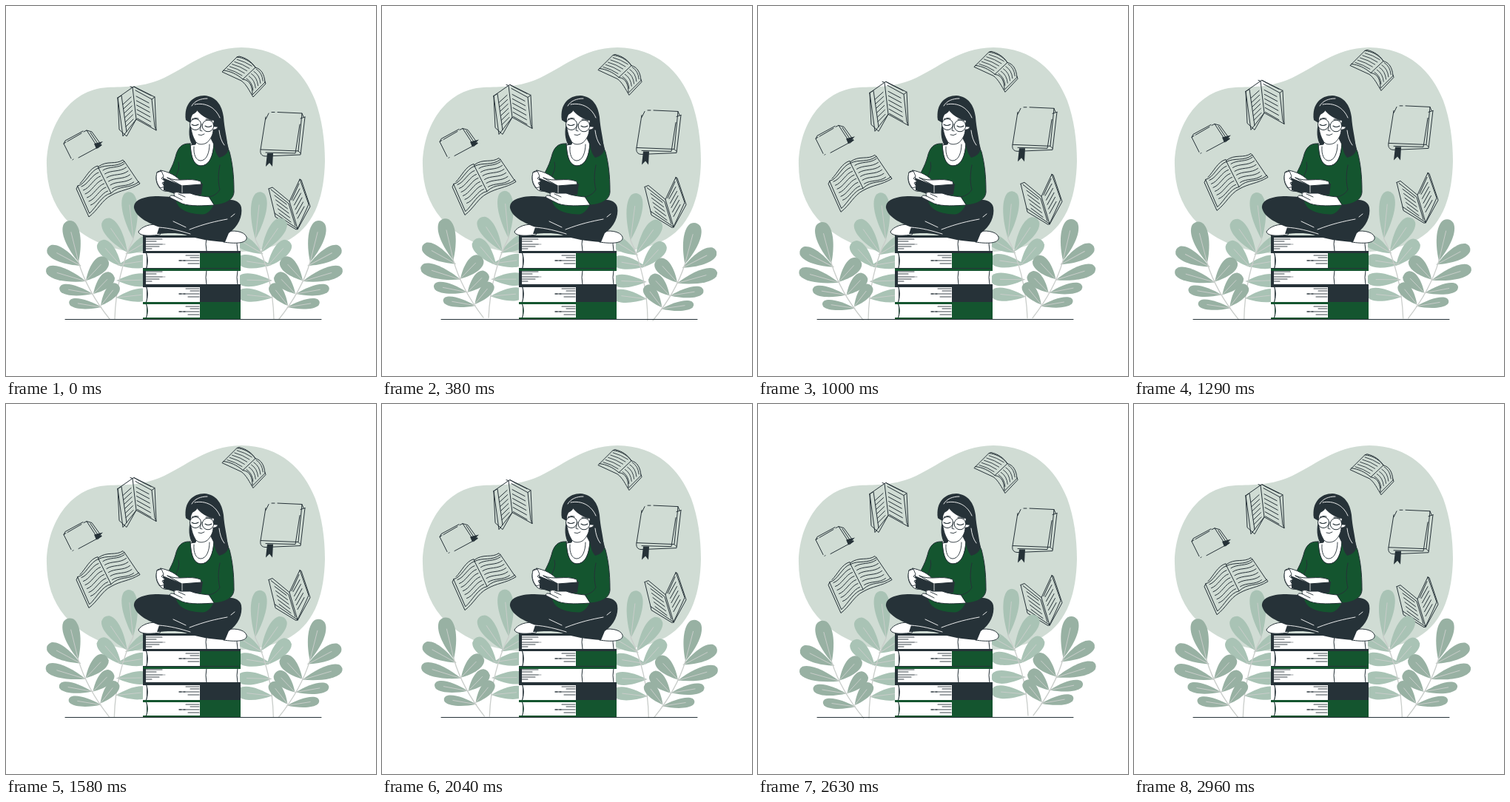
An HTML page with a canvas for the animation above (3000 ms loop, 500x500 px).

```html
<!DOCTYPE html>
<html lang="en">
<head>
<meta charset="utf-8">
<title>Reading on a stack of books</title>
<style>
html, body { margin: 0; width: 100%; height: 100%; overflow: hidden; background: #fff; }
canvas { display: block; width: 500px; height: 500px; }
</style>
</head>
<body>
<canvas id="stage"></canvas>
<script>
const INK = '#263238', GREEN = '#14552f', BLOB = '#d0dcd4';
const LEAF_DARK = '#98b1a3', LEAF_LIGHT = '#a9c3b5', STEM = '#c9cdca';
const canvas = document.getElementById('stage');
const dpr = window.devicePixelRatio || 1;
canvas.width = canvas.height = 500 * dpr;
const ctx = canvas.getContext('2d');
ctx.lineCap = ctx.lineJoin = 'round';

function fill(d, color) {
  ctx.fillStyle = color;
  ctx.fill(new Path2D(d));
}
function line(d, color = INK, width = 1) {
  ctx.strokeStyle = color;
  ctx.lineWidth = width;
  ctx.stroke(new Path2D(d));
}
function shape(d, color, edge = INK, width = 1) {
  fill(d, color);
  line(d, edge, width);
}
function rect(x, y, w, h, color) {
  ctx.fillStyle = color;
  ctx.fillRect(x, y, w, h);
}

function drawBlob() {
  fill('M55 215C55 163 85 113 137 110C161 109 181 110 207 100C245 84 269 57 318 56' +
    'C372 57 402 88 418 128C427 153 431 181 431 210C430 252 420 294 384 315' +
    'C354 331 322 333 288 333L185 334C142 331 105 315 80 287C63 267 55 242 55 215Z', BLOB);
}

// Floating books

function bookTopRight() {
  line('M294 87L312 69C321 70 330 74 337 83L320 99C312 92 303 88 294 87Z');
  line('M320 99C330 100 333 109 333 120L350 103C349 92 345 85 337 83');
  line('M294 87L292 89L318 101C325 106 329 115 334 123L351 105L350 102M312 69L315 68C324 70 332 75 337 83');
  for (let i = 0; i < 5; i++) {
    const x = 299 + i * 3.3, y = 85 - i * 3.2;
    line(`M${x} ${y}Q${x + 11} ${y + 3} ${x + 20} ${y + 9}`, INK, .9);
    line(`M${x + 26} ${y + 13}Q${x + 34} ${y + 18} ${x + 35} ${y + 29}`, INK, .9);
  }
}

function bookTent() {
  line('M151 124L171 110L176 153L158 176L151 124M151 124L153 167L163 176L176 153');
  line('M168 109L171 110L173 109L201 123L203 168L176 153M173 109L178 112L196 121');
  line('M151 124L156 121L163 170M201 123L197 126L201 163L203 168M197 126L175 114');
  for (let i = 0; i < 6; i++) {
    const y = 130 + i * 6;
    line(`M${158 + i * .8} ${y + 3}L${169 + i * .6} ${y - 7}`);
    line(`M${176 + i * .3} ${y - 8}L${193 + i * .6} ${y + 1 + i * .3}`);
  }
}

function bookSmallClosed() {
  line('M81 184L78 186L88 206M83 183L102 172M105 170L109 168L124 191L98 205M90 208L91 207');
  line('M109 168L116 170L129 188L124 192M114 171L126 189M78 186L80 182L104 169');
  fill('M119 186L131 183L127 187L130 188L122 193Z', INK);
}

function bookWide() {
  line('M97 243C107 242 114 222 125 219L142 253C130 255 122 272 113 280Z');
  line('M125 219C137 213 148 219 160 210L179 238C165 248 154 241 142 253');
  line('M97 243L95 247L112 285C124 276 130 262 142 256C156 248 166 249 181 240L179 237');
  line('M100 240C108 232 113 219 124 216L125 219M125 217C137 208 148 215 158 208L160 210');
  for (let i = 0; i < 6; i++) {
    const x = 102 + i * 2.5, y = 244 + i * 5;
    line(`M${x} ${y}C${x + 9} ${y - 3} ${x + 14} ${y - 16} ${x + 23} ${y - 19}`);
    line(`M${x + 29} ${y - 22}C${x + 38} ${y - 28} ${x + 49} ${y - 24} ${x + 58} ${y - 31}`);
  }
}

function bookClosed() {
  line('M359 143.500L363 143.500M367 143.500L400 145L395 196L344 194L351 150');
  line('M400 145L402 150M404 150L398 201L351 203C345 203 343 199 344 194M398 152L404 150M395 196L398 199');
  line('M397 160L391 199L351 198M355 145L351 153');
  fill('M353 199L361 199L360 217L356 212L351 217Z', INK);
}

function bookFan() {
  line('M355 247L360 245L383 264L394 301L363 280L355 247');
  line('M358 248L382 267L391 297M363 280L364 285L392 302L394 301');
  line('M383 264L397 234L409 268L394 301M397 234L399 235L411 271L394 302M386 262L396 240');
  for (let i = 0; i < 5; i++) {
    const x = 363 + i * 1.5, y = 256 + i * 6;
    line(`M${x} ${y}L${x + 16} ${y + 12}`);
    line(`M${x + 25} ${y + 7}L${x + 34} ${y - 9}`);
  }
}

// Plants

function leaf(bx, by, tx, ty, w, color) {
  const len = Math.hypot(tx - bx, ty - by);
  const x = k => (k * len).toFixed(2), y = k => (k * w).toFixed(2);
  ctx.save();
  ctx.translate(bx, by);
  ctx.rotate(Math.atan2(ty - by, tx - bx));
  fill(`M0 0C${x(.35)} ${y(-.5)} ${x(.78)} ${y(-.78)} ${x(.95)} ${y(-.34)}` +
    `Q${x(1.04)} 0 ${x(.95)} ${y(.34)}C${x(.78)} ${y(.78)} ${x(.35)} ${y(.5)} 0 0Z`, color);
  line(`M0 0L${x(.72)} 0`, STEM, .9);
  ctx.restore();
}

const inner = [
  [172, 315, 165, 251, 19], [164, 333, 133, 288, 19], [156, 352, 126, 318, 18],
  [162, 335, 199, 313, 16], [151, 350, 196, 343, 16], [150, 371, 196, 370, 16],
  [149, 394, 196, 389, 16]
];
const outer = [
  [98, 346, 84, 290, 20], [101, 351, 56, 327, 17], [108, 372, 54, 356, 16],
  [117, 389, 72, 381, 13], [129, 407, 85, 400, 12], [108, 371, 136, 341, 18],
  [118, 389, 144, 362, 17], [128, 405, 151, 376, 15]
];

function drawPlants() {
  for (const l of inner) leaf(...l, LEAF_LIGHT);
  line('M147 423C148 382 158 343 172 315', STEM, 1.3);
  for (const l of outer) leaf(...l, LEAF_DARK);
  line('M140 423C120 398 106 373 98 346', STEM, 1.3);
}

// Stack

function volume(y, h, cover, spine) {
  const end = y + h;
  rect(185, y, 132, h, cover);
  fill(`M190 ${y + 3}L262 ${y + 3}V${end - 2}H190Q193 ${y + h / 2} 190 ${y + 3}Z`, '#fff');
  rect(185, y + 3, 5, h - 5, '#fff');
  line(`M189.500 ${y + 3}Q193 ${y + h / 2} 189.500 ${end - 2}`);
  rect(262, y + 2, 55, h - 3, spine);
  [[243, 6], [249, 9], [234, 13], [246, 17]].forEach(([x, dy]) => {
    line(`M${x} ${y + dy}H261`, INK, .9);
  });
  line(`M234 ${y + 13}h3M240 ${y + 13}h2`, INK, 1);
}

function paleVolume(y, h) {
  const end = y + h;
  rect(185, y, 130, h, INK);
  fill(`M189 ${y + 3}H314Q311 ${y + h / 2} 314 ${end - 2}H189Z`, '#fff');
  line(`M271 ${y + 3}Q269 ${y + h / 2} 271 ${end - 2}`);
  fill(`M316 ${y + 2}H313Q311 ${y + h / 2} 313 ${end - 2}H316Z`, '#fff');
  line(`M313 ${y + 3}Q311 ${y + h / 2} 313 ${end - 2}`);
  [[22, 5], [14, 8], [26, 12], [18, 15], [8, 18]].forEach(([w, dy]) => {
    line(`M189 ${y + dy}h${w}`, INK, .9);
  });
  line(`M212 ${y + 12}h4`, '#fff', 1.2);
}

function drawStack() {
  paleVolume(310, 23);
  volume(331, 26, INK, GREEN);
  paleVolume(354, 25);
  volume(376, 26, INK, INK);
  volume(400, 23, GREEN, GREEN);
  [[331, INK], [355, GREEN], [377, INK], [400, GREEN]].forEach(([y, c]) => rect(185, y, 132, 3, c));
  line('M80 423.500H426', INK, 1);
}

// Reader

function drawReader() {
  // hair behind
  fill('M243 154C240 132 253 121 268 121C284 122 292 134 294 150C295 166 299 179 300 193' +
    'L282 204L253 190C246 180 247 167 249 158Z', INK);
  // neck and chest
  shape('M258 180L256 187L249 188C250 204 253 215 263 216C275 216 280 202 281 187L276 177Z', '#fff');

  // legs and feet
  shape('M208 296C196 293 183 298 179 305C180 311 194 311 208 309Z', '#fff');
  shape('M294 306C306 302 322 304 325 312C327 320 313 322 294 319Z', '#fff');
  fill('M206 257C184 257 172 263 173 273C176 286 193 293 207 299L204 308C218 307 230 306 242 309' +
    'C259 315 278 318 296 319L301 307C314 298 320 284 318 272C316 263 306 261 297 262Z', INK);
  line('M206 299C222 300 236 304 249 308M248 302C269 294 283 291 299 288M304 285L309 281M226 291L243 299', '#fff', .9);

  // sweater
  shape('M249 186C238 185 232 191 229 204C225 218 219 226 216 234L231 244L229 261C231 276 247 282 267 282' +
    'C273 281 278 275 281 269C299 268 309 260 308 249C308 229 306 212 302 197C299 188 292 186 281 185' +
    'C280 203 275 216 263 216C253 215 250 203 249 186Z', GREEN);
  line('M289 215C286 229 287 241 289 248C285 255 279 257 274 258M233 211C235 219 232 225 229 231', INK, 1);
  fill('M281 184C281 193 284 200 288 205C296 203 300 198 301 193L294 168L282 166Z', INK);
  line('M254 190C253 201 257 209 263 209C271 209 275 198 275 187', INK, .9);

  // face
  shape('M250 147C248 161 251 174 255 181C258 188 265 188 271 185C276 181 280 174 280 167' +
    'C285 168 289 162 286 157L279 153C272 149 264 146 259 140C257 144 253 146 250 147Z', '#fff', INK, .9);
  fill('M257 139C261 147 272 153 281 155L279 163L289 164L292 146C288 130 274 125 260 130Z', INK);
  fill('M243 154C242 141 247 133 258 134C258 142 250 145 249 157Z', INK);
  line('M255 133C270 130 283 137 289 151M251 135C255 128 263 125 272 125M288 168C289 176 291 183 295 188', '#fff', .9);

  // glasses and features
  for (const [x, y, r] of [[256, 160, 7.5], [273, 162, 7.8]]) {
    ctx.beginPath();
    ctx.arc(x, y, r, 0, 7);
    ctx.fillStyle = '#fff';
    ctx.fill();
    ctx.strokeStyle = INK;
    ctx.lineWidth = 1;
    ctx.stroke();
  }
  line('M251 160Q255 163 260 160M269 162Q273 165 278 162M280 160L287 157', INK, 1.1);
  line('M251 153Q256 150 260 152M270 153Q275 152 279 155', INK, 1);
  line('M264 160L262 168L265 169M260 174Q264 176 268 173', INK, .9);

  // book in hands
  shape('M205 224C202 230 202 238 207 245C211 250 215 251 220 250L219 233L210 223Z', '#fff');
  fill('M212 231L237 241L266 240L264 255L238 257L213 249Z', INK);
  shape('M209 222C219 224 231 229 237 238L238 243L213 233Z', '#fff');
  shape('M218 232C233 239 247 231 263 237L264 241L238 243Z', '#fff');
  line('M238 243V255', '#fff', .8);
  shape('M204 225L210 223L213 230L210 233L215 237L211 239L214 244L209 246C203 240 202 232 204 225Z', '#fff', INK, .9);
  shape('M281 269C267 270 249 271 238 267L222 259C220 256 224 255 228 257' +
    'C225 252 230 250 236 253L249 253C256 256 265 257 274 258Z', '#fff');
  line('M228 257L238 262M233 254L242 258', INK, .9);
}

const floating = [bookTopRight, bookTent, bookSmallClosed, bookWide, bookClosed, bookFan];

function triangle(p) {
  if (p < .25) return p * 4;
  return p < .75 ? 2 - p * 4 : p * 4 - 4;
}

function draw(ms) {
  const t = ms % 3000;
  const lift = 10 * (1 - Math.abs(t / 1500 - 1));
  const sway = triangle((t % 1500) / 1500) * Math.PI / 180;

  ctx.setTransform(dpr, 0, 0, dpr, 0, 0);
  rect(0, 0, 500, 500, '#fff');
  drawBlob();

  ctx.save();
  ctx.translate(0, -lift);
  floating.forEach(f => f());
  ctx.restore();

  // Both plants turn about the middle of the stage
  ctx.save();
  ctx.translate(250, 250);
  ctx.rotate(sway);
  ctx.translate(-250, -250);
  drawPlants();
  ctx.translate(509, 0);
  ctx.scale(-1, 1);
  drawPlants();
  ctx.restore();

  drawStack();
  drawReader();
}

const start = performance.now();
function tick() {
  draw(Math.max(0, performance.now() - start));
  requestAnimationFrame(tick);
}
tick();
</script>
</body>
</html>
```
